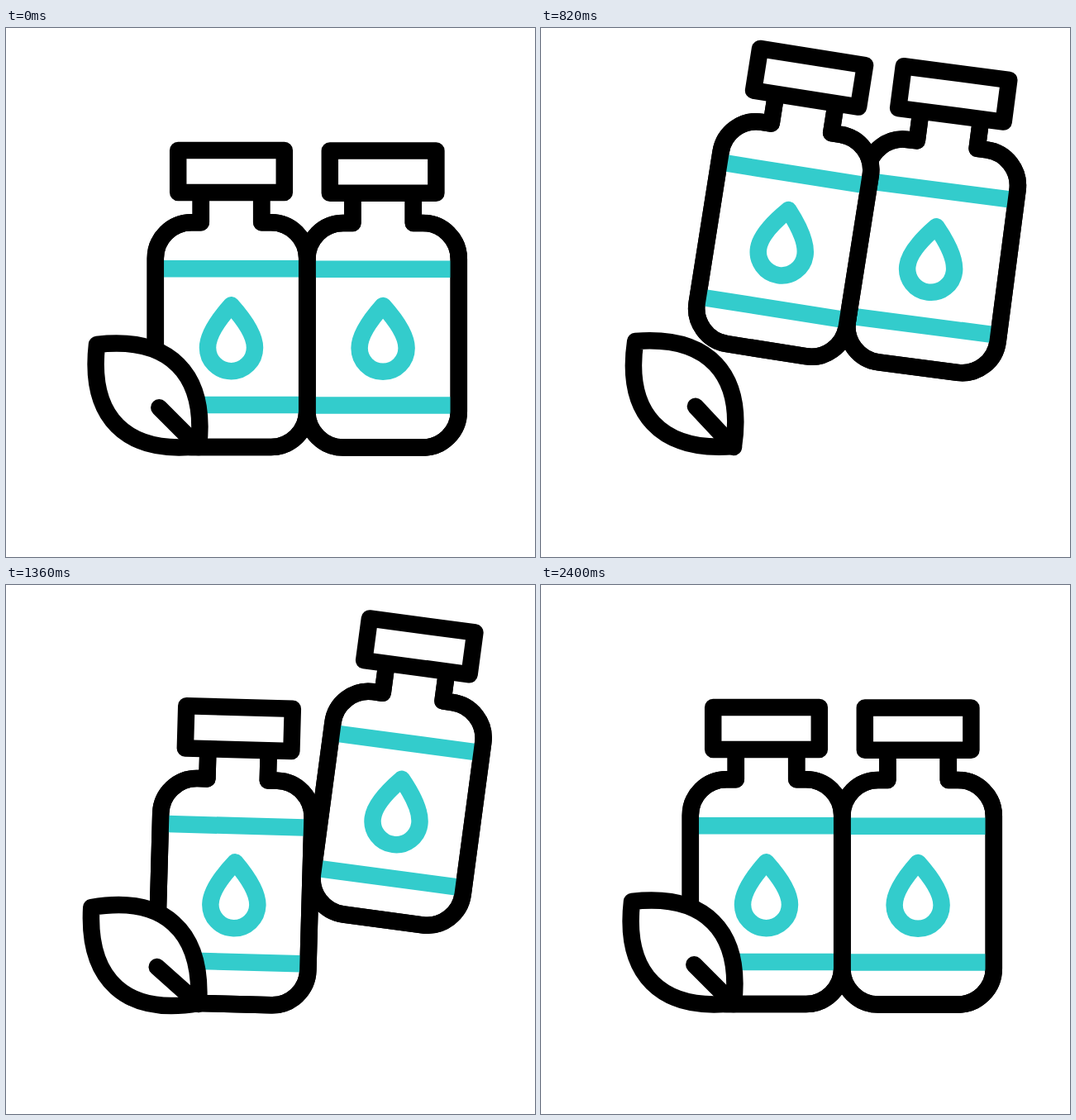
An HTML page that plays this animation: 640x640 px, repeating every 2.42 s.

```html
<!DOCTYPE html>
<html lang="en">
<head>
<meta charset="utf-8">
<title>Bottles and leaf</title>
<style>
html, body { margin: 0; height: 100%; overflow: hidden; background: #fff; }
svg { display: block; width: 100vw; height: 100vh; }
</style>
</head>
<body>
<svg viewBox="0 0 640 640" fill="#fff" stroke="#000" stroke-width="20.5" stroke-linejoin="round">
  <defs>
    <g id="bottle">
      <path id="body" d="M235.8 199V235.3H224.3A43.5 43.5 0 0 0 180.8 278.8V463.5A43.5 43.5 0 0 0 224.3 507H320.7A43.5 43.5 0 0 0 364.2 463.5V278.8A43.5 43.5 0 0 0 320.7 235.3H309.2V199"/>
      <g stroke="#3cc">
        <path d="M181 291.2H364M181 456H364"/>
        <path d="M272.5 335.3C262 347 244 369 244 386.7A28.5 28.5 0 0 0 301 386.7C301 369 283 347 272.5 335.3Z"/>
      </g>
      <use href="#body" fill="none"/>
      <rect x="208.2" y="147.9" width="128.6" height="51.2"/>
    </g>
  </defs>
  <use id="right" href="#bottle"/>
  <use id="left" href="#bottle"/>
  <g id="leaf" stroke-linecap="round">
    <path d="M110 383C198 373 243 418 233 506C145 516 100 471 110 383Z"/>
    <path d="M185.3 459.3L233 507"/>
  </g>
</svg>
<script>
const LOOP = 2420;
const $ = id => document.getElementById(id);

// Ease from 0 to 1 with flat ends; x1 and x2 are the handle lengths in time.
const ease = (x1, x2) => x => {
  let lo = 0, hi = 1;
  for (let i = 0; i < 24; i++) {
    const u = (lo + hi) / 2, v = 1 - u;
    if (3 * u * v * v * x1 + 3 * u * u * v * x2 + u ** 3 < x) lo = u; else hi = u;
  }
  return lo * lo * (3 - 2 * lo);
};
const smooth = ease(1 / 3, 2 / 3), rise = ease(.478, .131), fall = ease(.8, .6);

// Each key: [time, value, easing towards it]
function track(keys, t) {
  if (t <= keys[0][0]) return keys[0][1];
  for (let i = 1; i < keys.length; i++) {
    const [t0, v0] = keys[i - 1], [t1, v1, easing = smooth] = keys[i];
    if (t < t1) return v0 + (v1 - v0) * easing((t - t0) / (t1 - t0));
  }
  return keys.at(-1)[1];
}

const lift = [[0, 0], [800, -117.5, rise], [1200, 0, fall]];
const tilt = [[0, 0], [800, 9, rise], [1200, -2, fall], [1400, 2], [1600, 0]];
const sway = [[0, 0], [600, 5], [1200, -5], [1800, 5], [2400, 0]];

function placeBottle(id, x, y, t) {
  $(id).setAttribute("transform",
    `translate(${x} ${y + track(lift, t)}) rotate(${track(tilt, t)} 272.5 507)`);
}

function draw(now) {
  const t = now % LOOP;
  placeBottle("left", 0, 0, t);
  placeBottle("right", 183.6, .6, t - 400);
  $("leaf").setAttribute("transform", `rotate(${track(sway, t)} 233 506)`);
  requestAnimationFrame(draw);
}
draw(performance.now());
</script>
</body>
</html>
```
